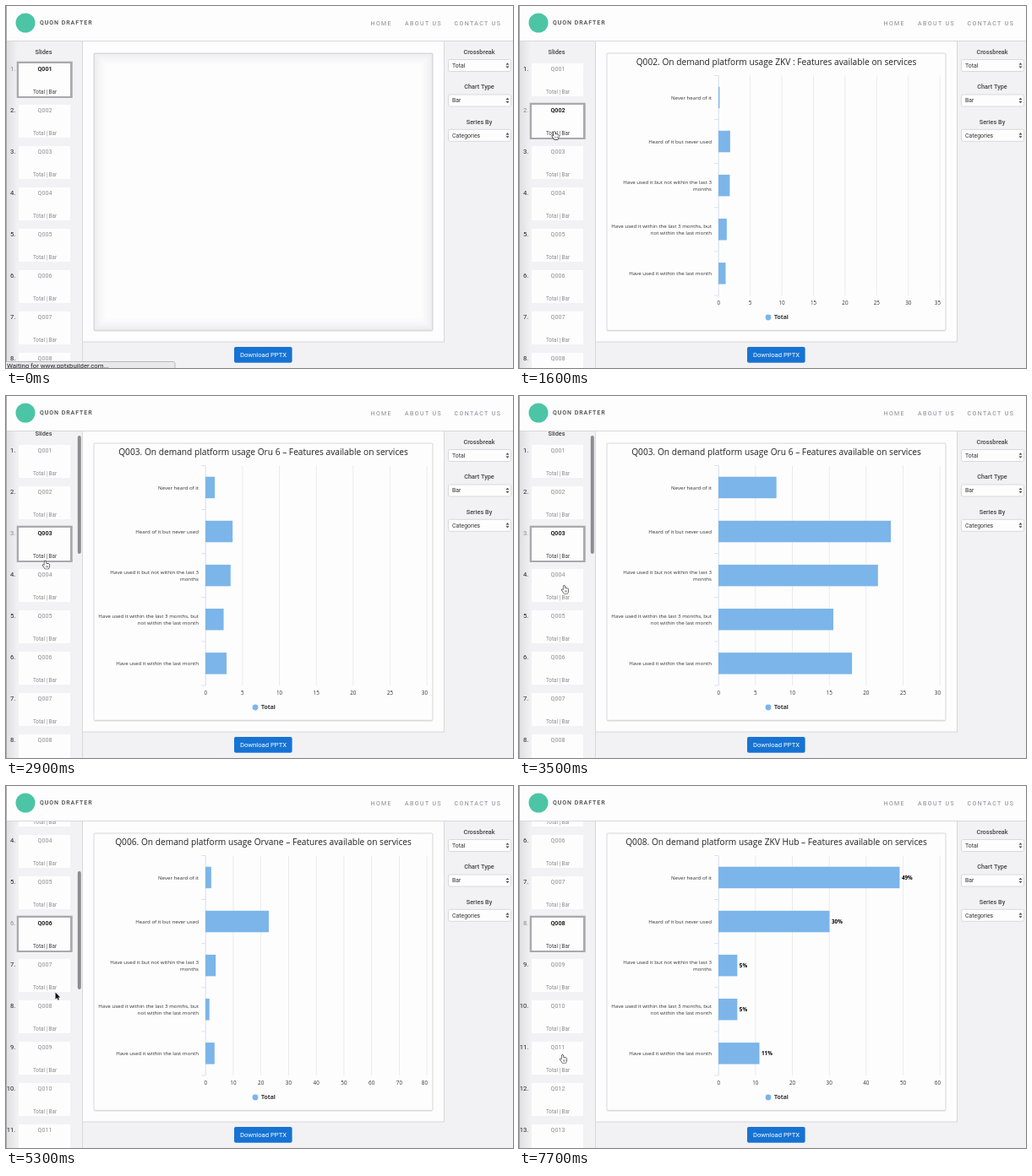
Write an HTML page with a canvas that moves like this. It is 600 by 429 pixels and loops after 8000 ms.

```html
<!DOCTYPE html>
<html lang="en">
<head>
<meta charset="utf-8">
<title>Chart slides</title>
<style>
html, body { margin: 0; width: 100%; height: 100%; overflow: hidden; background: #fff; }
canvas { display: block; width: 600px; height: 429px; }
</style>
</head>
<body>
<canvas id="stage"></canvas>
<script>
const W = 600, H = 429, LOOP = 8000, STEP = 100, GROW = 930;
const UI = 'Roboto, Arial, sans-serif';
const CHART = '"Open Sans", "Noto Sans", sans-serif';
const WHITE = '#fefdfe', SIDE = '#f2f1f3', LINE = '#d8d8db', BAR = '#7cb5e9';
const canvas = document.getElementById('stage');
const ctx = canvas.getContext('2d');
const dpr = window.devicePixelRatio || 1;
canvas.width = W * dpr;
canvas.height = H * dpr;

const activities = ['Read a printed newspaper', 'Visited a newspaper website', 'Read a printed magazine',
  'Read a digital magazine', 'Watched television', 'Watched television online or on demand',
  'Read a book', 'Read an e-book', 'None of the above'];
const usage = ['Never heard of it', 'Heard of it but never used',
  'Have used it but not within the last 3\nmonths',
  'Have used it within the last 3 months, but\nnot within the last month',
  'Have used it within the last month'];
const platform = name => 'On demand platform usage ' + name + ' Features available on services';

// at: slide is selected, grow: its bars start to move
const slides = [
  { n: 1, at: 0, grow: 20, max: 100, tick: 10, cats: activities,
    vals: [43, 41, 24.8, 4.8, 92.2, 36, 38.8, 17.8, 0],
    title: 'Which of the following have you done in the last week' },
  { n: 2, at: 1200, grow: 1454, max: 35, tick: 5, cats: usage,
    vals: [2, 30, 29, 21, 18], title: platform('ZKV :') },
  { n: 3, at: 2500, grow: 2663, max: 30, tick: 5, cats: usage,
    vals: [8, 23.9, 22.1, 15.9, 18.5], title: platform('Oru 6 –') },
  { n: 4, at: 3700, grow: 3960, max: 30, tick: 5, cats: usage,
    vals: [14, 26, 22, 17, 21], title: platform('Tavik 9 –') },
  { n: 6, at: 5100, grow: 4941, max: 80, tick: 10, cats: usage,
    vals: [6, 70, 11, 4, 9.7], title: platform('Orvane –') },
  { n: 8, at: 6300, grow: 6540, max: 60, tick: 10, cats: usage,
    vals: [49, 30, 5, 5, 11], title: platform('ZKV Hub –') }
];

// short stalls: [from, to, time shown]
const stalls = [[3500, 3700, 3500], [4000, 4200, 4000], [4900, 5100, 4900], [7700, 8000, 7700]];

// pointer tip: [time, x, y]
const path = [[1000, 2, 165], [1200, 41, 131], [1700, 42, 150], [2300, 43, 183.5], [2600, 44, 185],
  [3500, 53.5, 224], [3700, 53.5, 224], [4900, 59, 252], [5300, 58.5, 244.5],
  [6200, 58, 251], [6600, 56, 234], [7000, 54, 250], [7600, 51.5, 318]];

const clamp = v => Math.max(0, Math.min(1, v));
const ease = p => (1 - Math.cos(Math.PI * clamp(p))) / 2;
const pad = n => 'Q' + String(n).padStart(3, '0');

function text(str, x, y, size, color, opt = {}) {
  ctx.font = (opt.weight || 400) + ' ' + size + 'px ' + (opt.font || UI);
  ctx.letterSpacing = (opt.gap || 0) + 'px';
  ctx.textAlign = opt.align || 'left';
  ctx.fillStyle = color;
  ctx.fillText(str, x, y + size * 0.36);
}

function rect(x, y, w, h, color) {
  ctx.fillStyle = color;
  ctx.fillRect(x, y, w, h);
}

function round(x, y, w, h, r, fill, stroke) {
  ctx.beginPath();
  ctx.roundRect(x, y, w, h, r);
  if (fill) { ctx.fillStyle = fill; ctx.fill(); }
  if (stroke) { ctx.strokeStyle = stroke; ctx.lineWidth = 1; ctx.stroke(); }
}

function dot(x, y, r, color) {
  ctx.beginPath();
  ctx.arc(x, y, r, 0, 7);
  ctx.fillStyle = color;
  ctx.fill();
}

function poly(points, fill, stroke, width) {
  ctx.beginPath();
  for (let i = 0; i < points.length; i += 2) ctx.lineTo(points[i], points[i + 1]);
  ctx.closePath();
  ctx.lineJoin = 'round';
  ctx.lineWidth = width;
  ctx.strokeStyle = stroke;
  ctx.fillStyle = fill;
  ctx.stroke();
  ctx.fill();
}

function header() {
  rect(0, 0, W, 41, WHITE);
  rect(0, 41, W, 1, LINE);
  dot(23, 20, 11.5, '#4bc5a5');
  text('QUON DRAFTER', 40, 19.3, 7, '#444', { weight: 500, gap: 0.95 });
  const menu = { gap: 1.4 };
  text('HOME', 431.5, 20, 7, '#85858a', menu);
  text('ABOUT US', 472, 20, 7, '#85858a', menu);
  text('CONTACT US', 530.5, 20, 7, '#85858a', menu);
}

function picker(label, value, y) {
  text(label, 560, y - 16.3, 7.3, '#444', { weight: 500, align: 'center' });
  round(523.5, y - 7, 74, 14, 2, WHITE, '#d9d9dc');
  text(value, 528, y, 6.9, '#333');
  for (const d of [-1, 1]) {
    poly([591.7, y + d * 0.9, 595.3, y + d * 0.9, 593.5, y + d * 3], '#444', '#444', 0.2);
  }
}

function rightSide() {
  rect(518, 42, 82, 387, SIDE);
  rect(518, 42, 1, 356, LINE);
  picker('Crossbreak', 'Total', 70.5);
  picker('Chart Type', 'Bar', 112);
  picker('Series By', 'Categories', 153.3);
}

function footer() {
  rect(91, 398, 428, 31, SIDE);
  rect(91, 397.5, 428, 1, LINE);
  round(270, 404, 68.6, 18.7, 2, '#1673d3');
  text('Download PPTX', 304.5, 413, 7.7, '#fff', { align: 'center' });
}

function sidebar(current, scroll, t) {
  ctx.save();
  ctx.beginPath();
  ctx.rect(0, 42, 91, 387);
  ctx.clip();
  rect(0, 42, 90, 387, SIDE);
  const shade = ctx.createLinearGradient(0, 0, 14, 0);
  shade.addColorStop(0, '#dfdee1');
  shade.addColorStop(1, SIDE);
  rect(0, 42, 14, 387, shade);
  rect(90, 42, 1, 387, LINE);
  text('Slides', 44.5, 54 - scroll, 7.3, '#444', { weight: 500, align: 'center' });
  for (let n = 1; n <= 14; n++) {
    const y = 68 + 49 * (n - 1) - scroll;
    if (y < -40 || y > H) continue;
    const on = n === current;
    if (on) rect(12.7, y - 2.3, 66, 43.3, '#a9a8ab');
    rect(15, y, 61, 39, WHITE);
    text(n + '.', 11.2, y + 6, 7.6, on ? '#8a8a8a' : '#222', { align: 'right' });
    text(pad(n), 46, y + 6, 7.1, on ? '#222' : '#8b8b8e', { align: 'center', weight: on ? 700 : 400 });
    text('Total | Bar', 46, y + 33.5, 6.3, on ? '#444' : '#8b8b8e', { align: 'center' });
  }
  if (t >= 2500 && t < 6300) round(84.8, 43.3 + 0.367 * scroll, 4, 140, 2, '#8d8d90');
  ctx.restore();
}

function panel(blank) {
  rect(91, 42, 427, 356, WHITE);
  round(104, 57, 401, 329, 1, 'rgba(0,0,0,.07)');
  round(104, 56, 401, 328.3, 1, WHITE, '#d6d6d8');
  if (!blank) return;
  ctx.lineWidth = 1;
  for (let i = 0; i < 15; i++) {
    ctx.strokeStyle = 'rgba(60,60,70,' + 0.085 * (1 - i / 15) ** 1.4 + ')';
    ctx.strokeRect(104.5 + i, 56.5 + i, 400 - 2 * i, 327 - 2 * i);
  }
}

function chart(s, t) {
  const left = s.n === 1 ? 232 : 236, right = 498, top = 82.5, bottom = 343;
  const unit = (right - left) / s.max, pitch = (bottom - top) / s.cats.length;
  const thick = s.n === 1 ? 14 : 25.5;
  const grown = ease((t - s.grow) / GROW);
  const fade = clamp((t - s.grow - GROW + 60) / 160);
  const label = { font: CHART, weight: 500 };

  text(pad(s.n) + '. ' + s.title, 304.5, 66.3, 10.2, '#222', { ...label, align: 'center' });
  for (let v = 0; v <= s.max; v += s.tick) {
    const x = left + v * unit, last = v === s.max;
    rect(x - 0.2, top, 0.8, bottom - top, v ? '#e6e6e8' : '#ccd6eb');
    text(v, last ? 499 : x + 0.2, 351.5, 6.3, '#333', { ...label, align: last ? 'right' : 'center' });
  }
  for (let i = 0; i <= s.cats.length; i++) rect(left - 5, top + i * pitch - 0.3, 5, 0.7, '#ccd6eb');

  s.cats.forEach((cat, i) => {
    const y = top + pitch * (i + 0.5);
    const lines = cat.split('\n');
    lines.forEach((line, k) => {
      const dy = (k - (lines.length - 1) / 2) * 8;
      text(line, left - 8, y + dy, 6.15, '#333', { ...label, align: 'right' });
    });
    const w = s.vals[i] * unit * grown;
    if (w) rect(left, y - thick / 2 - 0.1, w + 0.5, thick, BAR);
    if (fade) {
      ctx.globalAlpha = fade;
      text(Math.round(s.vals[i]) + '%', left + w + 3, y, 6.25, '#000', { font: CHART, weight: 700 });
      ctx.globalAlpha = 1;
    }
  });
  dot(295, 369, 3.4, BAR);
  text('Total', 302, 369, 6.85, '#333', { font: CHART, weight: 700 });
}

function status() {
  round(-2, 421.5, 202, 12, 2, '#e9e8ea', '#b9b9bb');
  text('Waiting for www.pptxbuilder.com...', 1, 426, 7.8, '#222');
}

function pointer(t, scroll) {
  if (t < path[0][0]) return;
  const i = path.findIndex(p => p[0] > t);
  const b = path[i < 0 ? path.length - 1 : i];
  const a = i < 0 ? b : path[i - 1];
  const p = a === b ? 1 : ease((t - a[0]) / (b[0] - a[0]));
  const x = a[1] + (b[1] - a[1]) * p, y = a[2] + (b[2] - a[2]) * p;
  const row = (y + scroll - 68 + 490) % 49;
  ctx.save();
  ctx.translate(x, y);
  if (x > 15 && row < 39) {
    ctx.translate(0, 0.7);
    ctx.scale(0.92, 0.92);
    poly([-1, 0.8, 0, 0, 1, 0.8, 1.2, 3.6, 3, 3.5, 4.8, 4.2, 5.4, 5.2, 5.2, 7.4, 4.3, 10,
      0, 10, -1.6, 7.8, -3.2, 5.4, -2.4, 4.8, -1, 6], '#fff', '#222', 1.3);
    for (const k of [0.6, 2, 3.4]) rect(k, 6.2, 0.5, 2.4, '#444');
  } else {
    poly([0, 0, 0, 8.2, 1.9, 6.6, 3.1, 9.3, 4.4, 8.7, 3.2, 6.1, 5.7, 5.9], '#111', '#fff', 1.2);
  }
  ctx.restore();
}

function draw(time) {
  let t = Math.floor(((time + 15) % LOOP) / STEP) * STEP;
  for (const [from, to, shown] of stalls) if (t >= from && t < to) t = shown;
  const s = slides.filter(d => d.at <= t).pop();
  const scroll = Math.max(0, 49 * s.n - 137);
  const blank = t < s.grow;
  ctx.setTransform(dpr, 0, 0, dpr, 0, 0);
  rect(0, 0, W, H, WHITE);
  panel(blank);
  if (!blank) chart(s, t);
  sidebar(s.n, scroll, t);
  rightSide();
  footer();
  header();
  rect(0, 0, 1, H, '#a9a9ab');
  if (t < 300) status();
  pointer(t, scroll);
}

let begin = null;
function tick(now) {
  if (begin === null) begin = now;
  draw(now - begin);
  requestAnimationFrame(tick);
}
draw(0);
requestAnimationFrame(tick);
</script>
</body>
</html>
```
